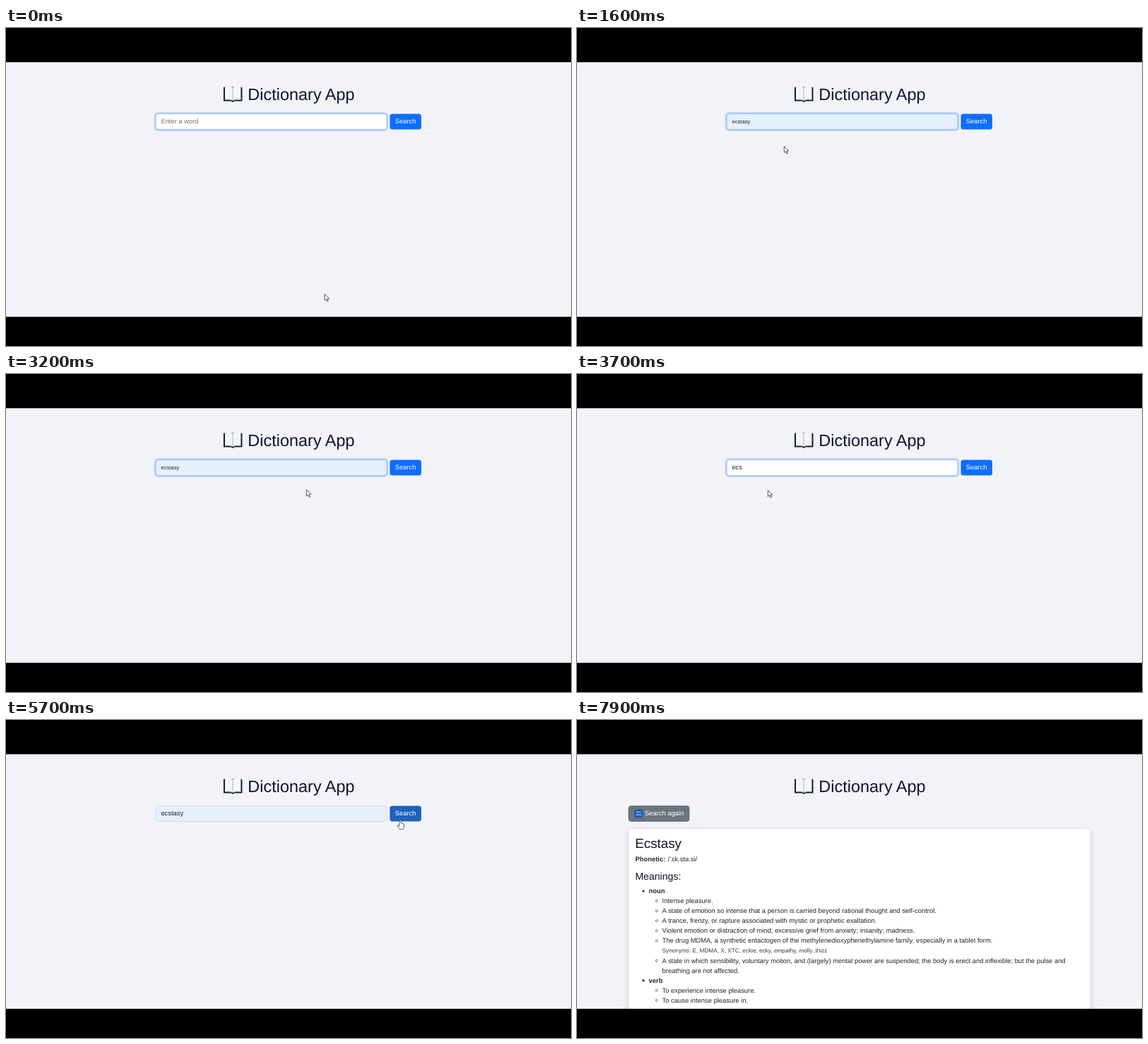
Animation of 800 by 450 pixels, one loop 8 s. Source, as an HTML page:

```html
<!DOCTYPE html>
<html lang="en">
<head>
<meta charset="utf-8">
<title>Dictionary App</title>
<style>
  html, body { margin: 0; width: 100%; height: 100%; overflow: hidden; background: #000; }
  svg { display: block; width: 800px; height: 450px; }
  text {
    font: 9.39px "Liberation Sans", Arial, sans-serif;
    fill: #212529;
    text-rendering: geometricPrecision;
    white-space: pre;
  }
  .title { font-size: 23.47px; fill: #11112f; }
  .word { font-size: 18.78px; fill: #11112f; }
  .section { font-size: 14.09px; fill: #11112f; }
  .bold { font-weight: bold; }
  .small { font-size: 8.22px; fill: #343a40; }
  .light { fill: #fff; }
</style>
</head>
<body>
<svg viewBox="0 0 800 450">
  <defs>
    <filter id="shadow" x="-10%" y="-15%" width="120%" height="130%">
      <feDropShadow dx="0" dy="4" stdDeviation="5" flood-opacity=".13"/>
    </filter>
  </defs>
  <rect y="48" width="800" height="361" fill="#f2f3f9"/>

  <g id="book">
    <path d="M308 84.5 Q308 83.5 309 83.5 H333 Q334.5 83.5 334.5 85 V103.5 H323.5 L321 105 L318.5 103.5 H308Z" fill="#171a33"/>
    <path d="M310 82.8 Q317 81.6 321 84 Q325 81.6 332.5 82.8 V101.4 Q325 100.5 321 102.6 Q317 100.5 310 101.4Z" fill="#f4f5f6"/>
    <path d="M321 84 V102.6 M310 101.4 Q317 100.5 321 102.6 Q325 100.5 332.5 101.4" fill="none" stroke="#a9adb8" stroke-width=".9"/>
  </g>
  <text class="title" x="342.3" y="101.6">Dictionary App</text>

  <g id="form">
    <rect id="ring" x="210.9" y="120.2" width="329.3" height="24.6" rx="4.8" fill="none" stroke="#bdd3fa" stroke-width="2.4"/>
    <rect id="field" x="212.1" y="121.5" width="326.9" height="22" rx="3.5" stroke-width=".8"/>
    <text id="entry" x="219.4" y="135.4"></text>
    <rect id="search" x="543.5" y="121.5" width="44.5" height="22" rx="3.5"/>
    <text class="light" x="550.8" y="135.4">Search</text>
  </g>

  <g id="result">
    <rect x="73" y="121.5" width="86" height="22" rx="3.5" fill="#6c757d" stroke="#5c646c" stroke-width=".7"/>
    <rect x="82.2" y="127" width="10.4" height="10.6" rx=".8" fill="#1763cf" stroke="#1b3f7c" stroke-width=".6"/>
    <path d="M84.5 130.3 H90.5 M84.5 130.3 l1.2 -1 M84.5 130.3 l1.2 1" stroke="#e3edfb" stroke-width=".7" fill="none"/>
    <text class="light" x="83.7" y="135.4" style="font-size:2.7px;font-weight:bold">BACK</text>
    <text class="light" x="96" y="135.4">Search again</text>
    <rect x="73" y="153.5" width="654" height="300" rx="4.7" fill="#fff" stroke="#d3d5db" stroke-width=".7" filter="url(#shadow)"/>
    <text class="word" x="82.3" y="180.6">Ecstasy</text>
    <text class="bold" x="82.6" y="199.8">Phonetic:</text>
    <text x="128.4" y="199.8">/ˈɛk.stə.si/</text>
    <text class="section" x="82.4" y="226.4">Meanings:</text>
    <g id="list"></g>
  </g>

  <g id="cursor" fill="#fff" stroke="#25252b" stroke-width=".75" stroke-linejoin="round">
    <path id="arrow" d="M.3 .4 V9.5 L2.4 7.6 L3.9 11 L5.4 10.3 L3.9 7 H6.7Z"/>
    <path id="hand" d="M0 1.1 Q1.1 -.3 2.2 1.1 V5 Q3.2 4.4 3.8 5.4 Q4.9 4.9 5.3 6 Q6.6 5.7 6.6 7.2 V10 L5.4 13.4 H.4 L-2.7 9 Q-2.6 7.3 -1.2 8 L0 9.2Z"/>
  </g>

  <rect width="800" height="48.4"/>
  <rect y="408.7" width="800" height="42"/>
</svg>
<script>
const LOOP = 8000, STEP = 100;
const $ = id => document.getElementById(id);

const senses = [
  ['pos', 'noun'],
  ['sense', 'Intense pleasure.'],
  ['sense', 'A state of emotion so intense that a person is carried beyond rational thought and self-control.'],
  ['sense', 'A trance, frenzy, or rapture associated with mystic or prophetic exaltation.'],
  ['sense', 'Violent emotion or distraction of mind; excessive grief from anxiety; insanity; madness.'],
  ['sense', 'The drug MDMA, a synthetic entactogen of the methylenedioxyphenethylamine family, especially in a tablet form.'],
  ['small', 'Synonyms: E, MDMA, X, XTC, eckie, ecky, empathy, molly, thizz'],
  ['sense', 'A state in which sensibility, voluntary motion, and (largely) mental power are suspended; the body is erect and inflexible; but the pulse and'],
  ['more', 'breathing are not affected.'],
  ['pos', 'verb'],
  ['sense', 'To experience intense pleasure.'],
  ['sense', 'To cause intense pleasure in.']
];

$('list').innerHTML = senses.map(([kind, words], i) => {
  const y = 245.1 + i * 14.06;
  const bullet = kind === 'pos'
    ? `<circle cx="94" cy="${y - 3.1}" r="1.6" fill="#212529"/>`
    : kind === 'sense'
      ? `<circle cx="112.8" cy="${y - 3.1}" r="1.5" fill="none" stroke="#212529" stroke-width=".6"/>`
      : '';
  const style = kind === 'pos' ? 'bold' : kind;
  return `${bullet}<text class="${style}" x="${kind === 'pos' ? 101.6 : 120.6}" y="${y}">${words}</text>`;
}).join('');

// Pointer path: time, x, y
const path = [
  [1100, 451, 376], [1300, 385, 290], [1500, 302, 180], [1600, 293, 167], [1800, 291, 165],
  [2000, 291, 165], [2300, 380, 166], [2700, 503, 149], [2900, 516, 152],
  [3300, 395, 167], [3700, 270, 164], [3900, 270, 164], [4300, 264, 165],
  [4400, 264, 165], [4800, 390, 162], [5200, 545, 146], [5300, 557, 141],
  [6800, 557, 141], [7200, 670, 190], [7700, 802, 250]
];

function pointerAt(t) {
  const next = path.findIndex(p => p[0] > t);
  if (next === 0) return path[0].slice(1);
  if (next < 0) return path[path.length - 1].slice(1);
  const a = path[next - 1], b = path[next];
  const k = (t - a[0]) / (b[0] - a[0]);
  return [a[1] + (b[1] - a[1]) * k, a[2] + (b[2] - a[2]) * k];
}

const within = (t, from, to) => t >= from && t < to;

function typedAt(t) {
  if (t < 100) return 'Enter a word';
  if (t < 600) return 'e';
  return t < 800 ? 'ec' : 'ecs';
}

function draw(t) {
  const preview = within(t, 1500, 2300) || within(t, 3200, 3600) || within(t, 4000, 4500);
  const chosen = t >= 4500;
  const filled = preview || chosen;
  const focused = t < 5600;
  const hover = within(t, 5300, 6700);
  const done = t >= 6700;

  $('form').style.display = done ? 'none' : '';
  $('result').style.display = done ? '' : 'none';

  $('ring').style.opacity = focused ? 1 : Math.max(0, 1 - (t - 5550) / 150);
  $('field').setAttribute('fill', filled ? '#e6f0fd' : '#fff');
  $('field').setAttribute('stroke', focused ? '#86b7fe' : '#c3d6e9');
  $('entry').textContent = filled ? 'ecstasy' : typedAt(t);
  $('entry').style.fontSize = preview ? '7.7px' : '';
  $('entry').style.fill = t < 100 ? '#6c757d' : '';
  $('search').setAttribute('fill', hover ? '#2060bd' : '#0d6efd');

  $('cursor').setAttribute('transform', `translate(${pointerAt(t)})`);
  $('arrow').style.display = hover ? 'none' : '';
  $('hand').style.display = hover ? '' : 'none';
}

const start = performance.now();
function tick() {
  const t = (performance.now() - start) % LOOP;
  draw(Math.floor(t / STEP) * STEP);
  requestAnimationFrame(tick);
}
draw(0);
requestAnimationFrame(tick);
</script>
</body>
</html>
```
